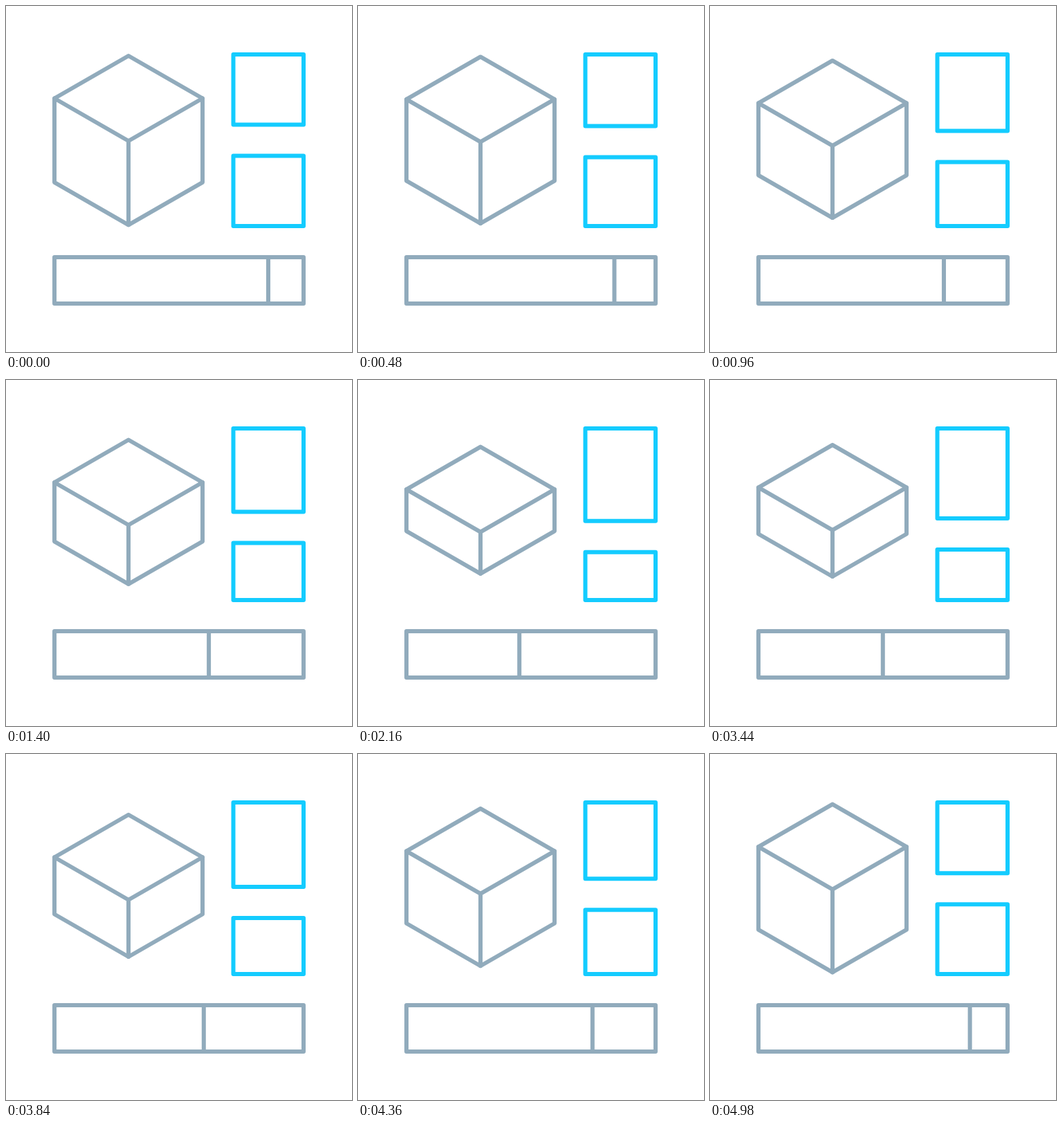
Write an HTML page with a canvas that moves like this. It is 500 by 500 pixels and loops after 5 s.

```html
<!DOCTYPE html>
<html lang="en">
<head>
<meta charset="utf-8">
<title>Cube and slider</title>
<style>
  html, body { margin: 0; width: 100%; height: 100%; overflow: hidden; background: #fff; }
  canvas { display: block; width: 500px; height: 500px; }
</style>
</head>
<body>
<canvas id="stage" width="500" height="500"></canvas>
<script>
const ctx = document.getElementById('stage').getContext('2d');
const LOOP = 5000, LEG = 2500, DOWN = 67, UP = 2745;
const GRAY = '#91abbc', BLUE = '#14ccff';

// cubic-bezier(.42, 0, .58, 1)
function ease(x) {
  if (x <= 0) return 0;
  if (x >= 1) return 1;
  let lo = 0, hi = 1;
  for (let i = 0; i < 24; i++) {
    const u = (lo + hi) / 2;
    if (u * (1.26 + u * (0.52 * u - 0.78)) < x) lo = u; else hi = u;
  }
  return lo * lo * (3 - 2 * lo);
}

function squash(t) {
  return ease((t - DOWN) / LEG) - ease((t - UP) / LEG);
}

function path(color, points, closed) {
  ctx.strokeStyle = color;
  ctx.beginPath();
  points.forEach(([x, y]) => ctx.lineTo(x, y));
  if (closed) ctx.closePath();
  ctx.stroke();
}

function box(color, x1, y1, x2, y2) {
  path(color, [[x1, y1], [x2, y1], [x2, y2], [x1, y2]], true);
}

function drawCube(p) {
  const left = 70, mid = 177, right = 284;
  const drop = 26 * p, lift = 38.5 * p;
  const back = 72 + drop, side = 133.5 + drop, front = 195 + drop;
  const foot = 254.8 - lift, base = 316.3 - lift;
  path(GRAY, [[mid, back], [right, side], [right, foot], [mid, base], [left, foot], [left, side]], true);
  path(GRAY, [[left, side], [mid, front], [right, side]]);
  path(GRAY, [[mid, front], [mid, base]]);
}

function draw(t) {
  const p = squash(t);
  ctx.fillStyle = '#fff';
  ctx.fillRect(0, 0, 500, 500);
  ctx.lineWidth = 6;
  ctx.lineJoin = ctx.lineCap = 'round';

  drawCube(p);

  const split = 171.5 + 34 * p;
  box(BLUE, 328.5, 70, 430, split);
  box(BLUE, 328.5, split + 45, 430, 318);

  const knob = 379 - 154 * p;
  path(GRAY, [[knob, 363], [knob, 430]]);
  box(GRAY, 70, 363, 430, 430);
}

const start = performance.now();
function tick() {
  draw((performance.now() - start) % LOOP);
  requestAnimationFrame(tick);
}
tick();
</script>
</body>
</html>
```
